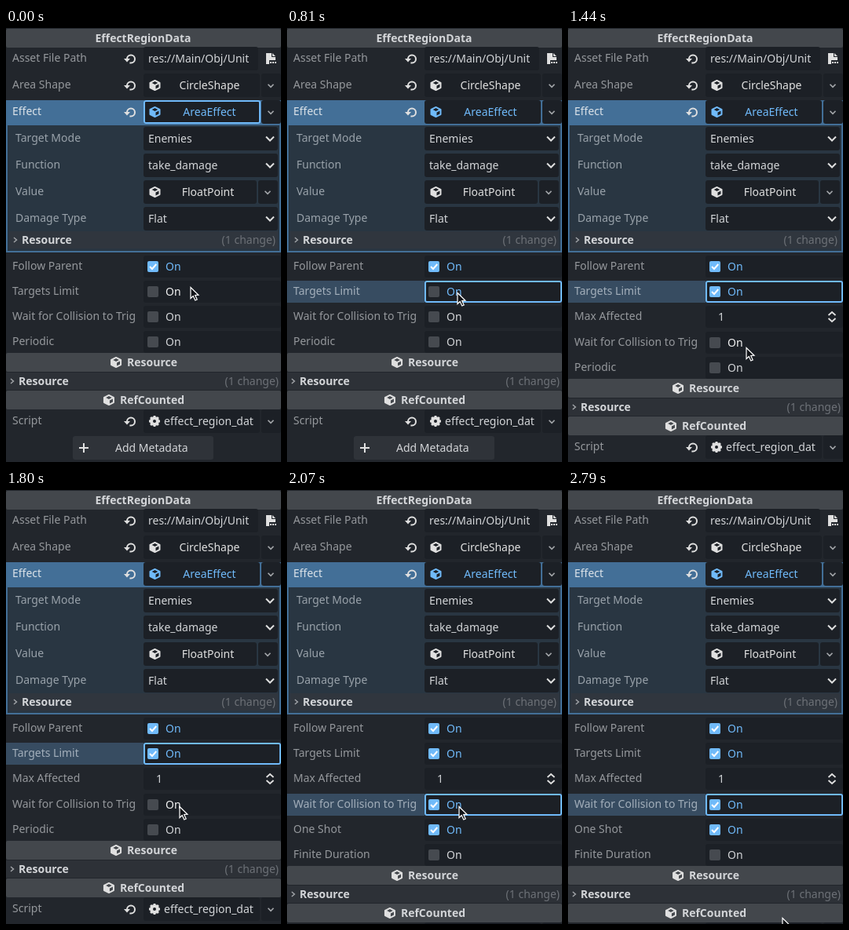
An HTML page with a canvas that plays this animation: 350x553 px, repeating every 2.88 s.

```html
<!DOCTYPE html>
<html lang="en">
<head>
<meta charset="utf-8">
<title>Inspector</title>
<style>
html, body { margin: 0; width: 100%; height: 100%; overflow: hidden; background: #22262c; }
canvas { display: block; width: 350px; height: 553px; }
</style>
</head>
<body>
<canvas id="stage"></canvas>
<script>
const W = 350, H = 553, STEP = 90, LOOP = 2880;
const canvas = document.getElementById('stage');
const ctx = canvas.getContext('2d');
const dpr = window.devicePixelRatio || 1;
canvas.width = W * dpr;
canvas.height = H * dpr;

const C = {
  bg: '#22262c', field: '#1c2026', category: '#43474c', section: '#2d3137',
  button: '#2f3339', text: '#d3d5d8', label: '#95989c', dim: '#6d7177',
  icon: '#e0e0e0', accent: '#70bafa', header: '#436f97', sub: '#293642',
  subLabel: '#99a2aa', selected: '#374c61', box: '#464a50'
};
const VALUE_X = 175;

// Cursor path: step, x, y
const PATH = [
  [0, 235, 330], [1, 233, 320], [2, 226, 311], [3, 214, 311], [4, 208, 322],
  [5, 214, 335], [6, 214, 335], [7, 217, 337], [11, 217, 337], [12, 217, 340],
  [13, 219, 350], [14, 223, 372], [15, 226, 396], [16, 227, 407], [18, 229, 407],
  [19, 226, 405], [20, 221, 403], [21, 219, 403], [24, 219, 403], [25, 219, 405],
  [26, 223, 413], [27, 231, 433], [28, 241, 459], [29, 253, 493], [30, 266, 533],
  [31, 273, 545]
];
const CLICKS = { limitPress: 9, limitOn: 10, waitPress: 22, waitOn: 23 };

const CUBE = new Path2D('M7.973 1.002a1 1 0 0 0-.42.104l-6 3A1 1 0 0 0 1 5v6a1 1 0 0 0 .553.895l6 3a1 1 0 0 0 .894 0l6-3A1 1 0 0 0 15 11V5a1 1 0 0 0-.553-.895l-6-3a1 1 0 0 0-.474-.103zM8 3.117 11.764 5 8 6.882 4.236 5zM13 6.617v3.764l-4 2v-3.764z');

function cursorAt(step) {
  let i = 0;
  while (i < PATH.length - 2 && PATH[i + 1][0] <= step) i++;
  const [s0, x0, y0] = PATH[i], [s1, x1, y1] = PATH[i + 1];
  const k = Math.min(1, (step - s0) / (s1 - s0));
  return { x: x0 + (x1 - x0) * k, y: y0 + (y1 - y0) * k };
}

function rect(x, y, w, h, color, r = 0) {
  ctx.fillStyle = color;
  ctx.beginPath();
  ctx.roundRect(x, y, w, h, r);
  ctx.fill();
}

function frame(x, y, w, h, color, r = 0) {
  ctx.strokeStyle = color;
  ctx.lineWidth = 2;
  ctx.beginPath();
  ctx.roundRect(x + 1, y + 1, w - 2, h - 2, r);
  ctx.stroke();
}

function text(s, x, y, color, align = 'left', weight = 400) {
  ctx.font = `${weight} 14px "Noto Sans", sans-serif`;
  ctx.textAlign = align;
  ctx.fillStyle = color;
  ctx.fillText(s, x, y);
}

function line(points, color, width = 2) {
  ctx.strokeStyle = color;
  ctx.lineWidth = width;
  ctx.beginPath();
  points.forEach(([x, y]) => ctx.lineTo(x, y));
  ctx.stroke();
}

function shape(points, color) {
  ctx.fillStyle = color;
  ctx.beginPath();
  points.forEach(([x, y]) => ctx.lineTo(x, y));
  ctx.closePath();
  ctx.fill();
}

function cube(x, y, color = C.icon) {
  ctx.save();
  ctx.translate(x - 8, y - 8);
  ctx.fillStyle = color;
  ctx.fill(CUBE, 'evenodd');
  ctx.restore();
}

function chevron(x, y, w, h, color, width) {
  line([[x - w, y - h / 2], [x, y + h / 2], [x + w, y - h / 2]], color, width);
}

function revert(y) {
  ctx.strokeStyle = C.icon;
  ctx.lineWidth = 2;
  ctx.beginPath();
  ctx.arc(159, y, 5, Math.PI, Math.PI * 2.6);
  ctx.stroke();
  shape([[150, y - 0.5], [158, y - 0.5], [154, y + 4]], C.icon);
}

function gear(x, y) {
  ctx.strokeStyle = C.icon;
  ctx.lineWidth = 4;
  ctx.beginPath();
  ctx.arc(x, y, 4, 0, 7);
  ctx.stroke();
  for (let i = 0; i < 8; i++) {
    const a = i * Math.PI / 4, c = Math.cos(a), s = Math.sin(a);
    line([[x + 5 * c, y + 5 * s], [x + 7 * c, y + 7 * s]], C.icon, 2.8);
  }
}

function fileIcon(x, y) {
  shape([[x - 6, y - 7], [x + 1, y - 7], [x + 1, y - 2], [x + 6, y - 2], [x + 6, y + 7], [x - 6, y + 7]], C.icon);
  shape([[x + 2, y - 7], [x + 6, y - 3], [x + 2, y - 3]], C.icon);
  rect(x - 2, y + 2, 9, 5, C.bg);
  for (let i = 0; i < 3; i++) rect(x - 1 + i * 3, y + 4, 2, 2, C.icon);
}

function category(name, y, icon = true) {
  rect(0, y - 12, W, 24, C.category, 2);
  ctx.font = '700 14px "Noto Sans", sans-serif';
  const mid = icon ? 186 : 174.5;
  if (icon) cube(mid - ctx.measureText(name).width / 2 - 14, y);
  text(name, mid, y + 5, C.text, 'center', 700);
}

function section(y, inset) {
  rect(inset, y - 11, W - inset * 2, 22, inset ? '#30363e' : C.section);
  const x = 8 + inset;
  line([[x - 2, y - 3], [x + 1.5, y], [x - 2, y + 3]], '#a0a3a7', 1.5);
  text('Resource', x + 8, y + 5, C.text, 'left', 700);
  text('(1 change)', 347 - inset, y + 5, C.dim, 'right');
}

function resourceField(name, y, right, color) {
  rect(VALUE_X, y - 15, right - 27 - VALUE_X, 30, C.field, 3);
  rect(right - 25, y - 15, 25, 30, C.field, 3);
  cube(189.5, y, color);
  text(name, right === W ? 259 : 257, y + 5, color, 'center');
  chevron(right - 13, y + 0.5, 3.5, 3.5, '#a2a5a9', 1.7);
}

function option(label, value, y) {
  text(label, 12, y + 4, C.subLabel);
  rect(VALUE_X, y - 15, 171, 30, C.field, 3);
  text(value, 181, y + 5, C.text);
  chevron(336, y, 5, 5, C.icon, 2);
}

function check(label, y, on, focus, cursor) {
  if (focus) rect(0, y - 14, VALUE_X, 28, C.selected);
  text(label, 8, y + 4, focus ? '#a3afbb' : C.label);
  rect(VALUE_X, y - 14, 175, 28, C.field, 3);
  rect(180, y - 7, 14, 14, on ? C.accent : C.box, 2);
  if (on) line([[183, y], [186, y + 3], [191.3, y - 3]], '#fff', 2);
  const hover = cursor.x > VALUE_X && Math.abs(cursor.y - y) < 14;
  text('On', 203, y + 5, on || focus ? C.accent : hover ? '#f2f2f2' : C.text);
  if (focus) frame(VALUE_X, y - 14, 175, 28, C.accent, 2);
}

function spin(label, value, y) {
  text(label, 8, y + 4, C.label);
  rect(VALUE_X, y - 14, 175, 28, C.field, 3);
  text(value, 191, y + 5, C.text);
  chevron(336, y - 4, 4.5, -4, C.icon, 1.8);
  chevron(336, y + 4, 4.5, 4, C.icon, 1.8);
}

function drawTop(focused) {
  category('EffectRegionData', 13, false);
  text('Asset File Path', 8, 43, C.label);
  revert(39.5);
  rect(VALUE_X, 24, 146, 30, C.field, 3);
  text('res://Main/Obj/Unit', 181, 44, C.text);
  fileIcon(337, 39);

  text('Area Shape', 8, 77, C.label);
  revert(73.5);
  resourceField('CircleShape', 73, W, C.icon);

  rect(0, 92, W, 31, C.header);
  text('Effect', 8, 111, '#dce3e9');
  revert(107.5);
  resourceField('AreaEffect', 107, W, C.accent);
  if (focused) frame(VALUE_X, 92, 149, 30, C.accent, 2);

  rect(0, 122, W, 164, C.sub);
  frame(0, 122, W, 164, C.header);
  option('Target Mode', 'Enemies', 141);
  option('Function', 'take_damage', 175);
  text('Value', 12, 213, C.subLabel);
  resourceField('FloatPoint', 209, 346, C.icon);
  option('Damage Type', 'Flat', 243);
  section(270, 4);
}

function drawBottom(y) {
  category('Resource', y);
  section(y + 24, 0);
  category('RefCounted', y + 48);
  text('Script', 8, y + 79, C.label);
  revert(y + 75.5);
  rect(VALUE_X, y + 60, 148, 30, C.field, 3);
  rect(325, y + 60, 25, 30, C.field, 3);
  gear(189, y + 75);
  text('effect_region_dat', 201, y + 80, C.text);
  chevron(337, y + 75.5, 3.5, 3.5, '#a2a5a9', 1.7);
  rect(85, y + 94, 179, 30, C.button, 3);
  line([[93, y + 109], [105, y + 109]], C.icon);
  line([[99, y + 103], [99, y + 115]], C.icon);
  text('Add Metadata', 139, y + 114, C.text);
}

function drawCursor({ x, y }) {
  ctx.save();
  ctx.translate(x, y);
  ctx.beginPath();
  [[0, 0.5], [0, 14.5], [3.2, 11.5], [5.8, 17], [8.2, 16], [5.7, 10.5], [10, 10.2]]
    .forEach(([px, py]) => ctx.lineTo(px, py));
  ctx.closePath();
  ctx.fillStyle = '#111317';
  ctx.strokeStyle = '#fff';
  ctx.lineWidth = 1.2;
  ctx.fill();
  ctx.stroke();
  ctx.restore();
}

function draw(ms) {
  const step = Math.floor((ms % LOOP) / STEP);
  const cursor = cursorAt(step);
  const limitFocus = step >= CLICKS.limitPress && step < CLICKS.waitPress;
  const limitOn = step >= CLICKS.limitOn;
  const waitFocus = step >= CLICKS.waitPress;
  const waitOn = step >= CLICKS.waitOn;

  ctx.setTransform(dpr, 0, 0, dpr, 0, 0);
  rect(0, 0, W, H, C.bg);
  drawTop(step < CLICKS.limitPress);
  check('Follow Parent', 304, true, false, cursor);
  check('Targets Limit', 336, limitOn, limitFocus, cursor);
  let y = 368;
  if (limitOn) {
    spin('Max Affected', '1', y);
    y += 33;
  }
  check('Wait for Collision to Trig', y, waitOn, waitFocus, cursor);
  y += 32;
  if (waitOn) {
    check('One Shot', y, true, false, cursor);
    y += 32;
  }
  check(waitOn ? 'Finite Duration' : 'Periodic', y, false, false, cursor);
  drawBottom(y + 26);
  drawCursor(cursor);
}

const start = performance.now();
function tick() {
  draw(performance.now() - start);
  requestAnimationFrame(tick);
}
tick();
</script>
</body>
</html>
```
